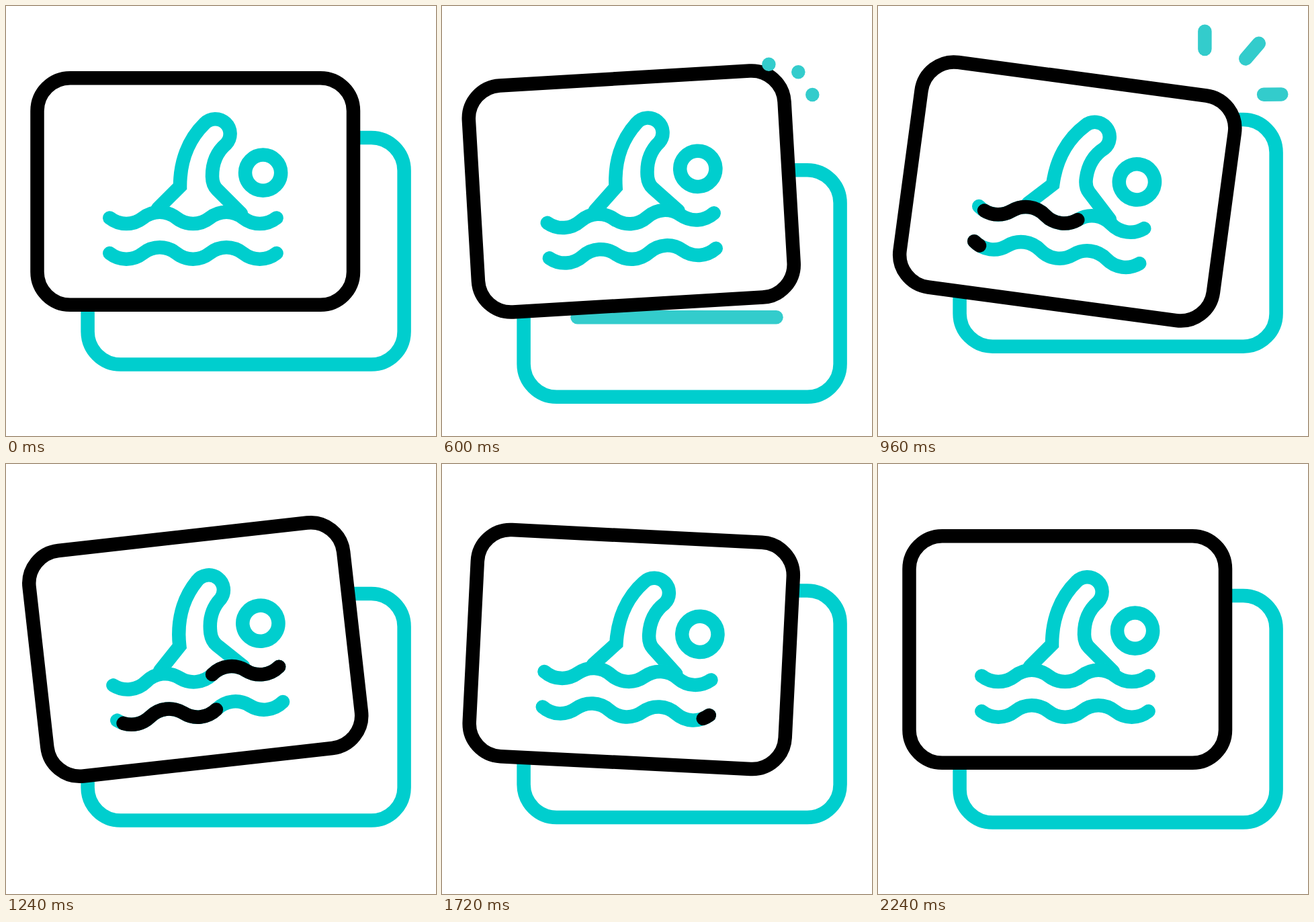
Recreate the animation shown at these times as an HTML page. Size 640x640 px, loop 2560 ms.

```html
<!DOCTYPE html>
<html lang="en">
<head>
<meta charset="utf-8">
<title>Swimming cards</title>
<style>
  html, body { margin: 0; width: 100%; height: 100%; overflow: hidden; background: #fff; }
  svg { display: block; width: 100vw; height: 100vh; }
  .stroke { fill: none; stroke-width: 20.5; stroke-linecap: round; }
  .teal { stroke: #00cece; }
  .soft { stroke: #3cc; }
  .black { stroke: #000; }
</style>
</head>
<body>
<svg viewBox="0 0 640 640">
  <g id="back" class="stroke">
    <rect class="teal" x="121.6" y="196" width="471" height="337.6" rx="49"/>
    <path class="soft" d="M201.5 415H497.5"/>
  </g>
  <g id="front" class="stroke">
    <rect class="black" x="46.5" y="107.2" width="470.5" height="337.6" rx="49" style="fill:#fff"/>
    <g class="teal">
      <path d="M226 301.5L259 268.5C259 232 271 199 295.5 175A22 22 0 0 1 327.5 205.5C314 217 307 234 307 253C307 261 309.500 268.500 314 273L350 309"/>
      <circle cx="382.6" cy="248.2" r="26.6"/>
      <path class="wave" data-y="315.4"/>
      <path class="wave" data-y="368"/>
    </g>
    <g class="black">
      <path class="wave flow" data-y="315.4" data-start="600" pathLength="1"/>
      <path class="wave flow" data-y="368" data-start="880" pathLength="1"/>
    </g>
  </g>
  <g id="rays" class="stroke soft"></g>
</svg>
<script>
const LOOP = 2560, STEP = 40;
const $ = id => document.getElementById(id);
const back = $('back'), front = $('front'), rays = $('rays');

// Key times and values of the two damped swings
const TILT = [[0, 0], [440, -11.1], [840, 11.3], [1240, -6.4], [1640, 3.2], [2040, 0]];
const BOB = [[200, 0], [640, 49.2], [1040, -35], [1440, 29], [1840, -17], [2240, 0]];

// Inner and outer end of each ray
const RAYS = [[486.4, 86.7, 486.4, 33.5], [530.3, 98.3, 570, 52], [551.3, 132, 604.5, 131.4]];

const ease = p => (1 - Math.cos(Math.PI * Math.min(1, Math.max(0, p)))) / 2;

function keyed(keys, t) {
  let value = keys[0][1];
  for (let i = 1; i < keys.length; i++) {
    const [t0, v0] = keys[i - 1], [t1, v1] = keys[i];
    if (t >= t0) value = v0 + (v1 - v0) * ease((t - t0) / (t1 - t0));
  }
  return value;
}

function wavePath(y) {
  const w = 49.65;
  let d = `M154.3 ${y}`;
  for (let i = 0; i < 5; i++) {
    const bend = i % 2 ? -11.6 : 11.6;
    d += `c14.8 ${bend} ${w - 14.8} ${bend} ${w} 0`;
  }
  return d;
}

document.querySelectorAll('.wave').forEach(w => w.setAttribute('d', wavePath(+w.dataset.y)));
const flows = [...document.querySelectorAll('.flow')];
const rayPaths = RAYS.map(() =>
  rays.appendChild(document.createElementNS('http://www.w3.org/2000/svg', 'path')));

function drawFlow(path, t) {
  const begin = +path.dataset.start;
  const head = ease((t - begin) / 640), tail = ease((t - begin - 280) / 640);
  path.style.display = head - tail > 0.0001 ? '' : 'none';
  path.setAttribute('stroke-dasharray', `${head - tail} 2`);
  path.setAttribute('stroke-dashoffset', -tail);
}

function drawRays(t) {
  rays.style.display = t >= 600 && t < 1200 ? '' : 'none';
  const tail = ease((t - 760) / 440), head = ease((t - 600) / 440);
  RAYS.forEach(([x0, y0, x1, y1], i) => {
    const at = p => `${x0 + (x1 - x0) * p} ${y0 + (y1 - y0) * p}`;
    rayPaths[i].setAttribute('d', `M${at(tail)}L${at(head)}`);
  });
}

function draw(t) {
  back.setAttribute('transform', `translate(0 ${keyed(BOB, t)})`);
  front.setAttribute('transform', `rotate(${keyed(TILT, t)} 281.8 276)`);
  flows.forEach(path => drawFlow(path, t));
  drawRays(t);
}

const origin = performance.now();
function tick() {
  const t = (performance.now() - origin) % LOOP;
  draw(Math.floor(t / STEP) * STEP);
  requestAnimationFrame(tick);
}
tick();
</script>
</body>
</html>
```
